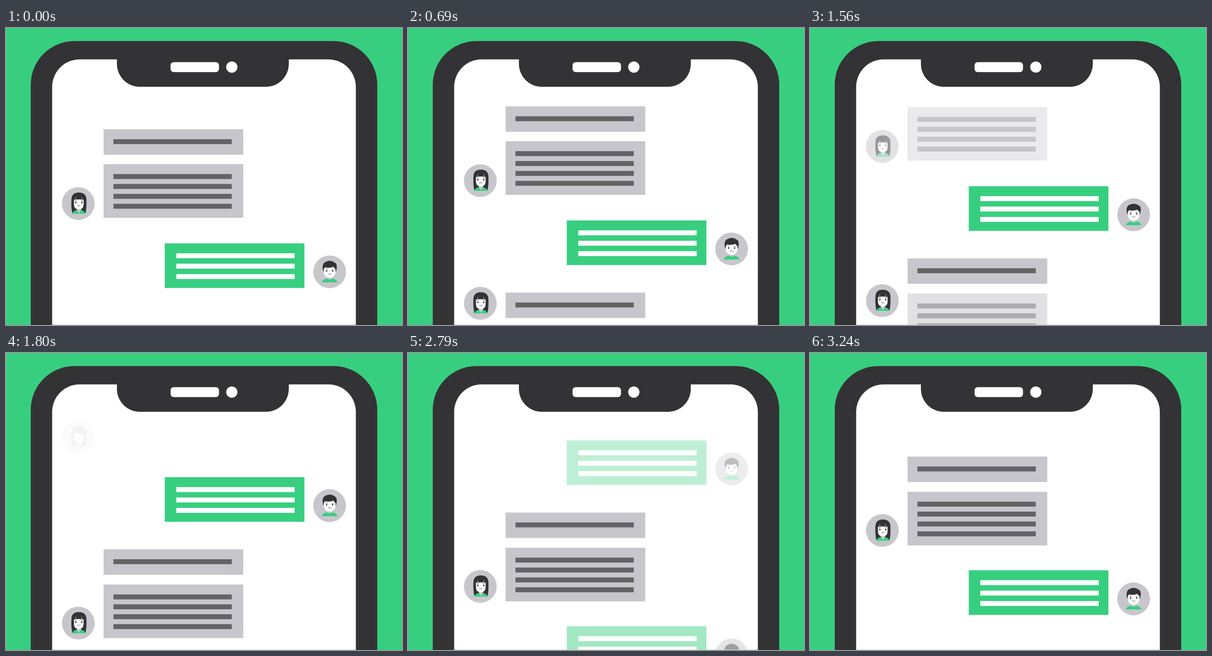
An HTML page that plays this animation: 864 by 648 pixels, repeating every 3600 ms.

```html
<!DOCTYPE html>
<html lang="en">
<head>
<meta charset="utf-8">
<title>Chat</title>
<style>
  html, body { margin: 0; width: 100%; height: 100%; overflow: hidden; background: #37cf7f; }
  svg { display: block; width: 864px; height: 648px; }
</style>
</head>
<body>
<svg viewBox="0 0 864 648">
  <defs>
    <g id="girl">
      <circle r="35.8" fill="#c7c6cc"/>
      <path d="M-13 21.5C-15.500 10-15.500 0-15-10C-14.500-20-8-24 1-24S17-20 17.600-10C18 0 18 10 16 20.500L11 21.500Z" fill="#333335"/>
      <path d="M-3 10H6V17L1.500 22L-3 17Z" fill="#c7c6cc"/>
      <path d="M-9.500-9H11.500V2C11.500 9 7 13 1 13S-9.500 9-9.500 2Z" fill="#fff"/>
      <path d="M-9-13H11L11.500-8Q1-10-9.500-8Z" fill="#333335"/>
      <path d="M-6.200-9L-5-14M8.200-9L7-14" stroke="#fff" stroke-width=".7"/>
      <path d="M-13.700 22.200Q-12.500 17.500-3.500 14L1.300 21L6 14Q15 17.500 16 22.200Z" fill="#37cf7f"/>
      <use href="#look" x="1"/>
    </g>
    <g id="boy">
      <circle r="35.8" fill="#c7c6cc"/>
      <path d="M-5 9H5V18H-5Z" fill="#c7c6cc"/>
      <path d="M-17.300 23C-15 17.500-11 15.500-5.500 14.800Q0 19.500 5.500 14.800C11 15.500 15 17.500 17.300 23Z" fill="#37cf7f"/>
      <path d="M-14-1C-16.500-11-15.500-18-10-21C-3-25.500 6-24.500 10-20.500C16-19 17-12 14-1Z" fill="#333335"/>
      <path d="M-12.800-5Q-11-10-9-9.500Q0-7.500 8-11Q10-8 12.800-6V0C12.800 8 7 13 0 13S-12.800 8-12.800 0Z" fill="#fff"/>
      <use href="#look"/>
    </g>
    <g id="look">
      <g fill="#333335"><circle cx="-6.500" cy="-2" r="1.700"/><circle cx="6.500" cy="-2" r="1.700"/></g>
      <path d="M-8.800-5.500Q-6.500-6.800-4.300-5.700M8.800-5.500Q6.500-6.800 4.300-5.700M-3.500 4.300Q0 6.200 3.500 4.300" fill="none" stroke="#333335" stroke-width=".9"/>
    </g>
  </defs>
  <path d="M54 648V123A95 95 0 0 1 149 28.500H715A95 95 0 0 1 810 123V648Z" fill="#333335"/>
  <path d="M100.700 648V129A60 60 0 0 1 160.700 68.500H703.300A60 60 0 0 1 763.300 129V648Z" fill="#fff"/>
  <g id="chat"></g>
  <path d="M242 60V78.500A50 50 0 0 0 292 128.300H567A50 50 0 0 0 617 78.500V60Z" fill="#333335"/>
  <rect x="359" y="74.500" width="105.700" height="21.700" rx="7" fill="#fff"/>
  <circle cx="492.700" cy="85.200" r="12.300" fill="#fff"/>
  <rect x="100.700" y="647" width="662.600" height="1" fill="#c9c9cb"/>
</svg>
<script>
const LOOP = 3600, STEP = 30;
const chat = document.getElementById('chat');
const clamp = v => Math.min(1, Math.max(0, v));
const span = (t, from, to) => clamp((t - from) / (to - from));

// cubic-bezier(2/3, 0, 1/3, 1)
function ease(x) {
  let lo = 0, hi = 1;
  for (let i = 0; i < 30; i++) {
    const u = (lo + hi) / 2;
    if (2 * u - 3 * u * u + 2 * u ** 3 < x) lo = u; else hi = u;
  }
  return lo * lo * (3 - 2 * lo);
}

const rect = (x, y, w, h, fill) =>
  `<rect x="${x}" y="${y}" width="${w}" height="${h}" fill="${fill}"/>`;

function bubble(x, height, color, lineX, lineColor, lines, gap) {
  let out = rect(x, 0, 304.7, height, color);
  for (let i = 0; i < lines; i++) out += rect(lineX, 21.6 + i * gap, 258.2, 10.8, lineColor);
  return out;
}
const gray = (lines, height) => bubble(212.9, height, '#c7c6cc', 234.4, '#636365', lines, 21.6);
const green = () => bubble(346.4, 97.3, '#37cf7f', 371.6, '#fff', 3, 22.7);
const girl = '<use href="#girl" x="157.800"/>', boy = '<use href="#boy" x="706.100"/>';

// y: start position, fadeIn / fadeOut: [from, to], second: travel of the middle scroll
const items = [
  { art: gray(1, 55.5), y: 221, fadeOut: [1290, 1440] },
  { art: gray(4, 117), y: 297.1, fadeOut: [1290, 1710] },
  { art: girl, y: 383, fadeOut: [1290, 1830] },
  { art: green(), y: 469.9, fadeOut: [2400, 2970] },
  { art: boy, y: 532, fadeOut: [2400, 2970] },
  { art: gray(1, 55.5), y: 627.3, fadeIn: [120, 690] },
  { art: girl, y: 650.6, fadeIn: [120, 690], second: 11.4 },
  { art: gray(4, 117), y: 704.1, fadeIn: [1290, 1800] },
  { art: green(), y: 875.4, fadeIn: [2400, 3240] },
  { art: boy, y: 937.7, fadeIn: [2400, 3240] }
];
for (const item of items) {
  item.node = document.createElementNS('http://www.w3.org/2000/svg', 'g');
  item.node.innerHTML = item.art;
  chat.append(item.node);
}

function draw(t) {
  const a = ease(span(t, 120, 690)), b = ease(span(t, 1290, 1830)), c = ease(span(t, 2400, 3240));
  for (const { node, y, fadeIn, fadeOut, second = 149.3 } of items) {
    const alpha = (fadeIn ? span(t, ...fadeIn) : 1) * (fadeOut ? 1 - span(t, ...fadeOut) : 1);
    node.setAttribute('transform', `translate(0 ${y - 50 * a - second * b - 202 * c})`);
    node.setAttribute('opacity', alpha);
  }
}

const start = performance.now();
function tick() {
  const t = (performance.now() - start) % LOOP;
  draw(Math.floor(t / STEP) * STEP);
  requestAnimationFrame(tick);
}
tick();
</script>
</body>
</html>
```
